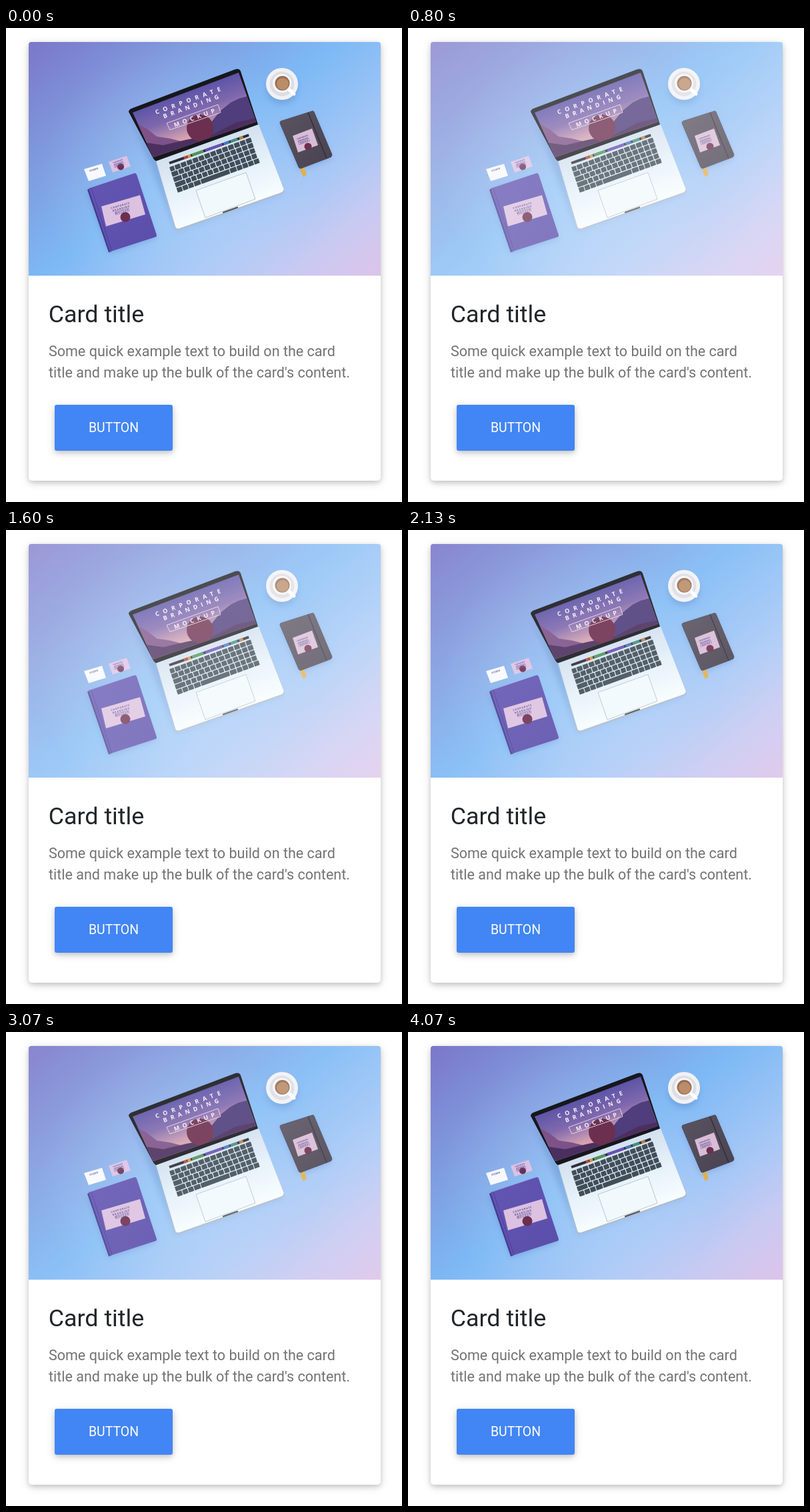
Write an HTML page that moves like this. It is 594 px wide and 712 px high and loops after 4.47 s.

```html
<!DOCTYPE html>
<html lang="en">
<head>
<meta charset="utf-8">
<title>Card</title>
<style>
html, body { margin: 0; width: 594px; height: 712px; overflow: hidden; background: #fff; }
body { position: relative; font-family: Roboto, sans-serif; }
.card, .btn { position: absolute; box-shadow: 0 3px 7.5px rgba(0,0,0,.16), 0 3px 15px rgba(0,0,0,.12); }
.card { left: 34px; top: 21px; width: 528px; height: 659px; border-radius: 5px; background: #fff; }
.btn { left: 73px; top: 566px; width: 177px; height: 69px; border-radius: 3px; background: #4285f4; }
svg { position: absolute; left: 0; top: 0; }
.print { font-family: "Open Sans", sans-serif; text-anchor: middle; font-weight: 700; }
</style>
</head>
<body>
<div class="card"></div>
<div class="btn"></div>
<svg width="594" height="712" viewBox="0 0 594 712">
  <defs>
    <linearGradient id="desk" gradientUnits="userSpaceOnUse" x1="34" y1="21" x2="407" y2="490">
      <stop offset="0" stop-color="#7b77c9"/><stop offset=".25" stop-color="#7f9bdf"/>
      <stop offset=".48" stop-color="#7db9f5"/><stop offset=".72" stop-color="#a8c8f6"/>
      <stop offset=".86" stop-color="#c8caf2"/><stop offset="1" stop-color="#dcc4ea"/>
    </linearGradient>
    <radialGradient id="glow">
      <stop offset="0" stop-color="#fff" stop-opacity=".22"/><stop offset="1" stop-color="#fff" stop-opacity="0"/>
    </radialGradient>
    <linearGradient id="sky" gradientUnits="userSpaceOnUse" x1="262" y1="92" x2="292" y2="174">
      <stop offset="0" stop-color="#5650a6"/><stop offset=".45" stop-color="#8069ad"/>
      <stop offset=".8" stop-color="#d3a0b0"/><stop offset="1" stop-color="#e0b0ac"/>
    </linearGradient>
    <linearGradient id="metal" gradientUnits="userSpaceOnUse" x1="300" y1="172" x2="337" y2="276">
      <stop offset="0" stop-color="#d3e0ee"/><stop offset=".5" stop-color="#e6f1fa"/>
      <stop offset="1" stop-color="#f8fdff"/>
    </linearGradient>
    <linearGradient id="cover" x1="0" y1="0" x2="1" y2="1">
      <stop offset="0" stop-color="#6455b3"/><stop offset="1" stop-color="#5a4eaa"/>
    </linearGradient>
    <linearGradient id="dark" x1="0" y1="0" x2="1" y2="1">
      <stop offset="0" stop-color="#5a5462"/><stop offset="1" stop-color="#484250"/>
    </linearGradient>
    <radialGradient id="wave">
      <stop offset="0" stop-color="#fff" stop-opacity=".13"/><stop offset=".4" stop-color="#fff" stop-opacity=".2"/>
      <stop offset=".5" stop-color="#fff" stop-opacity=".27"/><stop offset=".6" stop-color="#fff" stop-opacity=".34"/>
      <stop offset=".7" stop-color="#fff" stop-opacity="0"/>
    </radialGradient>
    <clipPath id="frame"><path d="M34 372V25a4 4 0 0 1 4-4H558a4 4 0 0 1 4 4V372Z"/></clipPath>
    <clipPath id="screen"><path d="M190 127L349 67L375 141L221 194Z"/></clipPath>
    <filter id="soft" x="-30%" y="-30%" width="160%" height="160%"><feGaussianBlur stdDeviation="4"/></filter>
  </defs>
  <g clip-path="url(#frame)">
    <path fill="url(#desk)" d="M34 21H562V372H34Z"/>
    <circle cx="260" cy="225" r="210" fill="url(#glow)"/>
    <g filter="url(#soft)" fill="#3b5fa8" opacity=".25">
      <path d="M186 130L228 196L256 302L415 247L413 250L255 305L216 204Z"/>
      <path d="M122 246L190 226L225 316L154 339Z"/>
      <path d="M411 144L461 130L488 196L440 214Z"/>
      <circle cx="414" cy="91" r="23"/>
    </g>

    <!-- laptop -->
    <path fill="#aebccb" d="M225 200L379 146L417 241Q419 246 414 249L261 303Q255 305 253 300Z"/>
    <path fill="url(#metal)" d="M225 199L379 145L416 240Q418 244 413 247L260 301Q255 302 254 298Z"/>
    <path fill="#17171d" d="M184 126Q184 123 188 121L344 62Q350 60 352 65L378 145L225 200Q222 198 221 196Z"/>
    <g clip-path="url(#screen)">
      <path fill="url(#sky)" d="M184 60H380V200H184Z"/>
      <path fill="#7d5288" d="M196 143L212 152L226 163L246 166L270 172L300 166L240 200H200Z"/>
      <path fill="#4f3d7c" d="M304 146L322 124L337 112L349 106L364 102L380 146L306 172Z"/>
      <path fill="#4b2f5e" d="M208 172L236 176L270 168L310 160L345 142L380 134V152L220 200Z"/>
      <circle cx="291" cy="150" r="20" fill="#6d2f4f"/>
    </g>
    <g class="print" fill="#f6f0fa" font-size="9">
      <text transform="translate(277 111) rotate(-20)" letter-spacing="6.300">CORPORATE</text>
      <text transform="translate(281 120) rotate(-20)" letter-spacing="5.600">BRANDING</text>
      <text transform="translate(286 137) rotate(-20)" letter-spacing="5">MOCKUP</text>
    </g>
    <path fill="none" stroke="#e9dff0" stroke-width=".9" d="M241 143L318 115L322 127L246 153Z"/>
    <g id="keys" transform="matrix(.946 -.346 .31 .929 245 209)"></g>
    <g id="bar" stroke-width="4" transform="matrix(.946 -.335 .31 .929 245 203)"></g>
    <path fill="#f2f9fd" stroke="#b5bfca" stroke-width=".9" d="M285 244L360 217L374 257L299 285Z"/>
    <path stroke="#4b535c" stroke-width="2.200" stroke-linecap="round" d="M326 277L347 269.500"/>

    <!-- cup -->
    <circle cx="414" cy="84" r="24" fill="#f1f1f5"/>
    <circle cx="414" cy="84" r="18.500" fill="#dcdde5"/>
    <path stroke="#fff" stroke-width="5" stroke-linecap="round" d="M424 92L432 99"/>
    <circle cx="414" cy="83" r="14" fill="#f8f6f6"/>
    <circle cx="414.500" cy="83" r="11" fill="#966c54"/>
    <circle cx="415" cy="84" r="9" fill="#b98d6a"/>

    <!-- notebook -->
    <path fill="#e0b04a" d="M441 212L447 209L451 220L446 224Z"/>
    <path fill="url(#dark)" stroke="#47414f" stroke-width=".8" stroke-linejoin="round" d="M412 140L459 125Q461 124 462 126L489 190Q489 193 487 194L442 211Q440 211 439 209L411 143Q411 141 412 140Z"/>
    <path stroke="#332e3c" stroke-width="1.500" d="M453 127L481 196"/>
    <path fill="#d9bcd6" d="M430 162L459 151L468 176L438 187Z"/>
    <circle cx="453" cy="178" r="5.500" fill="#6d2f4f"/>

    <!-- book and cards -->
    <path fill="#453a8f" d="M122 243L127 240L158 336L154 337Z"/>
    <path fill="url(#cover)" d="M124 241L193 218Q195 218 196 220L226 311Q226 314 224 314L156 336Z"/>
    <path stroke="#473c93" stroke-width=".8" d="M128 241L159 335"/>
    <path fill="#dcc1e0" d="M143 268L201 251L209 280L150 298Z"/>
    <circle cx="179" cy="284" r="7.500" fill="#6d2f4f"/>
    <path fill="#f7f9fe" d="M117 212L144 204L150 222L124 230Z"/>
    <path fill="#dcc1e4" d="M154 201L181 192L187 208L160 217Z"/>
    <circle cx="172" cy="208.500" r="5" fill="#6d2f4f"/>
    <g id="labels" class="print" fill="#5b4f93"></g>

    <path id="veil" fill="#fff" d="M34 21H562V372H34Z"/>
    <g id="waves"></g>
  </g>
  <text x="63.700" y="442" font-size="35.850" fill="#212529">Card title</text>
  <g font-size="21.560" fill="#747373">
    <text x="63.900" y="493">Some quick example text to build on the card</text>
    <text x="63.900" y="525">title and make up the bulk of the card's content.</text>
  </g>
  <text x="124" y="607" font-size="19.440" fill="#fff">BUTTON</text>
</svg>
<script>
const $ = id => document.getElementById(id);
function add(parent, tag, attrs, text) {
  const el = document.createElementNS("http://www.w3.org/2000/svg", tag);
  for (const k in attrs) el.setAttribute(k, attrs[k]);
  if (text) el.textContent = text;
  parent.appendChild(el);
  return el;
}

// Keyboard: four staggered rows and a bottom row with the space bar
const key = (x, y, w) => add($("keys"), "rect", { x, y, width: w, height: 7.3, rx: 0.8, fill: "#404e58" });
for (let row = 0; row < 4; row++) {
  const first = 8 + row * 3;
  const step = (130 - first) / 13;
  key(0, row * 8.5, first - 1.2);
  for (let i = 0; i < 13; i++) key(first + i * step, row * 8.5, step - 1.2);
}
[[0, 8], [9, 8], [18, 8], [27, 10], [38, 45], [84, 10], [95, 8], [104, 8], [113, 8], [122, 8]]
  .forEach(([x, w]) => key(x, 34, w));

// Touch strip
[[0, 126, "#2b2d38"], [23, 5, "#c8433d"], [29, 5, "#d99b38"], [36, 18, "#4a9a58"], [57, 27, "#6a50bb"],
 [86, 9, "#4678c8"], [97, 11, "#3f9480"], [111, 6, "#bb8240"]]
  .forEach(([x, w, stroke]) => add($("bar"), "line", { x1: x, x2: x + w, y1: 0, y2: 0, stroke }));

function label(x, y, size, angle, gap = 0) {
  const g = add($("labels"), "g", { transform: `translate(${x} ${y}) rotate(${angle})`, "font-size": size, "letter-spacing": gap });
  ["CORPORATE", "BRANDING", "MOCKUP"].forEach((word, i) => add(g, "text", { y: i * size * 1.2 }, word));
  const w = size * 5.6;
  add(g, "rect", { x: -w / 2, y: size * 1.5, width: w, height: size * 1.15, fill: "none", stroke: "#5b4f93", "stroke-width": 0.4 });
}
label(172, 268, 3.8, -16, 0.8);
label(445, 165, 3, -20);
label(168, 201, 2.6, -18);
add($("labels"), "text", { transform: "translate(132 214) rotate(-17)", "font-size": 3.6 }, "STUDIO");

const LOOP = 4470, TICK = 200 / 3, FADE = 500;
const clicks = [{ at: 620, hold: 460 }, { at: 1280, hold: 350 }, { at: 2220, hold: 350 }];
clicks.forEach(c => c.el = add($("waves"), "circle", { cx: 300, cy: 195, fill: "url(#wave)" }));

const part = (t, start, span) => Math.min(1, Math.max(0, (t - start) / span));
const easeOut = p => 1 - (1 - p) ** 2;
const smooth = p => p * p * (3 - 2 * p);

function draw(ms) {
  const t = Math.floor((ms + 4) / TICK) * TICK;
  const hover = smooth(part(t, 150, 380)) - smooth(part(t, 3680, 390));
  $("veil").setAttribute("opacity", 0.1 * hover);
  for (const { at, hold, el } of clicks) {
    el.setAttribute("r", 2640 * easeOut(part(t, at, FADE)));
    el.setAttribute("opacity", 1 - easeOut(part(t, at + hold, FADE)));
  }
}

let start;
function loop(now) {
  start ??= now;
  draw((now - start) % LOOP);
  requestAnimationFrame(loop);
}
draw(0);
requestAnimationFrame(loop);
</script>
</body>
</html>
```
